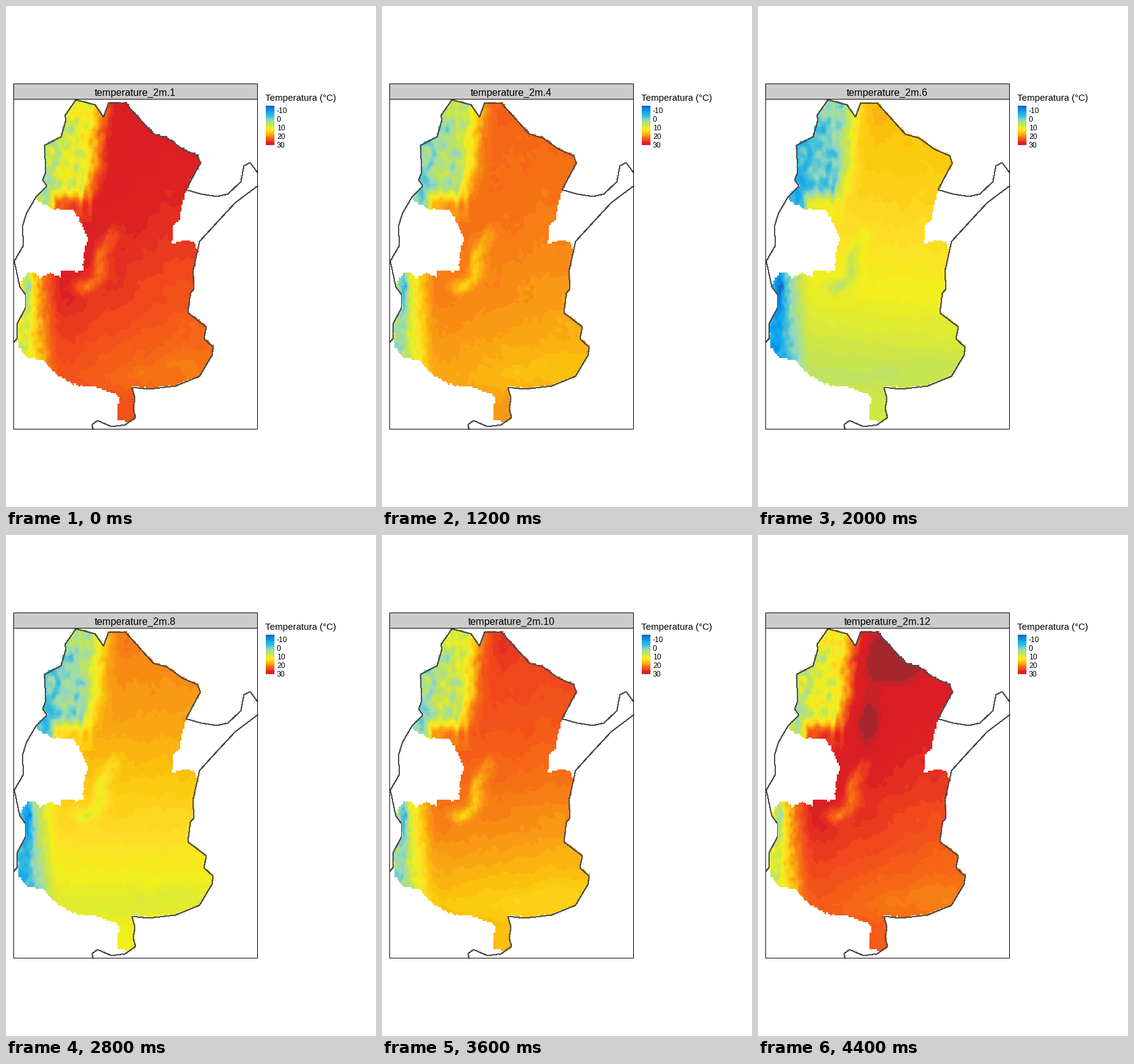
Write a matplotlib script that moves like this. It is 601 px wide and 814 px high and loops after 4.8 s.

```python
import numpy as np
import matplotlib.pyplot as plt
from matplotlib.animation import FuncAnimation
from matplotlib.colors import to_rgb
from matplotlib.patches import Rectangle
from matplotlib.path import Path

W, H, DPI = 601, 814, 100
PX = 72 / DPI
FONT = "Liberation Sans"

# Colour scale: temperature -> colour
SCALE = [(-15, "#1a62b8"), (-11, "#0a8fe8"), (-8, "#10a8ee"), (-3, "#45c0d8"),
         (1, "#95d9be"), (6.5, "#c8e650"), (10.5, "#f3f01c"), (13, "#ffdc28"),
         (15.5, "#fcc80c"), (18, "#faa014"), (20.5, "#f77614"), (24, "#f2471c"),
         (26.5, "#dc2024"), (29.2, "#da1e24"), (30.4, "#a5272d")]
STOPS = np.array([t for t, _ in SCALE])
COLOURS = np.array([to_rgb(c) for _, c in SCALE])
STEP = 0.8

# Country border in three strokes
EAST_LINE = [
    (113, 152), (144, 160), (158, 180), (166, 157), (194, 158), (239, 208),
    (261, 214), (286, 232), (311, 243), (315, 255), (292, 298), (316, 305),
    (342, 309), (360, 305), (381, 285), (386, 259), (396, 254), (408, 270)]
SOUTH_LINE = [
    (408, 292), (372, 319), (345, 348), (314, 382), (303, 431), (305, 459),
    (299, 466), (295, 498), (325, 521), (321, 540), (336, 554), (334, 567),
    (314, 601), (275, 617), (231, 622), (204, 619), (209, 637), (206, 654),
    (210, 668), (193, 680), (171, 683), (148, 673), (139, 680), (141, 687)]
WEST_LINE = [
    (113, 152), (95, 178), (97, 184), (89, 212), (62, 226), (64, 270),
    (59, 282), (66, 292), (48, 310), (33, 336), (26, 358), (28, 388),
    (13, 414), (22, 456), (31, 468), (31, 490), (17, 517), (18, 539), (13, 545)]

# Where the raster leaves the border
INNER_EAST = [(289, 308), (281, 348), (270, 361), (269, 387), (294, 381),
              (304, 384), (311, 399)]
INNER_SOUTH = [(203, 677), (181, 671), (181, 633), (150, 620), (107, 616),
               (76, 594), (60, 577), (33, 571), (20, 556)]
INNER_WEST = [(23, 448), (35, 433), (47, 433), (54, 442), (70, 434), (89, 441),
              (89, 430), (125, 431), (125, 406), (133, 380), (120, 350),
              (107, 331), (76, 331), (52, 318)]
LAND_EDGE = (EAST_LINE[:11] + INNER_EAST + SOUTH_LINE[4:19] + INNER_SOUTH
             + WEST_LINE[17:12:-1] + INNER_WEST + WEST_LINE[8:0:-1])

# Lowland temperature through the year at both ends of the map
KEY_MONTHS = [1, 3, 4, 6, 7, 9, 11, 12]
NORTH_TEMP = [27.2, 24.4, 21.4, 15.9, 15, 24, 24.9, 28.2]
SOUTH_TEMP = [20.3, 17, 15.9, 6.3, 6, 11.8, 16.6, 19.8]

# Cell grid of the raster
X0, Y0, DX, DY, NX, NY = 12.5, 152, 2.3, 2.73, 144, 195
X, Y = np.meshgrid(X0 + DX * (np.arange(NX) + .5), Y0 + DY * (np.arange(NY) + .5))

rng = np.random.default_rng(7)


def noise(nx, ny):
    """Random field smoothed over nx by ny cells, with unit spread."""
    a = rng.normal(size=X.shape)
    for axis, n in ((1, nx), (0, ny)):
        for _ in range(2):
            a = np.apply_along_axis(np.convolve, axis, a, np.ones(n) / n, "same")
    return a / a.std()


def bump(cx, cy, sx, sy):
    return np.exp(-((X - cx) / sx) ** 2 - ((Y - cy) / sy) ** 2)


def rise(v):
    return 1 / (1 + np.exp(-v))


def land_mask():
    ragged = [X + .7 * noise(2, 2), Y + .7 * noise(2, 2)]
    cells = np.column_stack([c.ravel() for c in ragged])
    return Path(LAND_EDGE).contains_points(cells).reshape(X.shape)


def north_range():
    foot = 155 - 29 * ((Y - 160) / 170).clip(0, 1) ** 1.7
    d = X - foot
    drop = 16 * rise(-(d + 3) / 8) + 2.5 * rise(-(d - 8) / 6) + 5 * rise(-(d + 65) / 9)
    valley = rise((Y - 309) / 4) * rise((X - 75) / 3)
    drop *= 1 - .8 * valley
    drop += 6 * bump(121, 312, 3.5, 20) + 3 * bump(136, 320, 3.5, 22)
    drop += 4 * bump(62, 300, 9, 22)
    rough = 1.9 * noise(3, 4) * np.clip(drop / 12, 0, 1)
    return (drop + rough) * (Y < 352)


def south_range():
    drop = 13 * rise((48 - X) / 8) + 4 * rise((72 - X) / 5) + 8 * bump(35, 468, 7, 42)
    rough = 1.4 * noise(2, 3) * np.clip(drop / 12, 0, 1)
    return (drop + rough) * (Y > 425)


def central_hills():
    ridge = np.interp(Y, [355, 405, 440, 465], [177, 154, 149, 124])
    width = np.where(X > ridge, 15, 9)
    span = rise((Y - 364) / 7) * rise((466 - Y) / 4)
    drop = 3.5 * np.exp(-((X - ridge) / width) ** 2) * span
    drop += 2 * bump(150, 418, 8, 32) + 3 * bump(122, 455, 14, 11)
    return drop * (1 + .15 * noise(2, 3))


LAND = land_mask()
NORTH, SOUTH, HILLS = north_range(), south_range(), central_hills()
FIXED = (.1 * noise(3, 3) + .12 * noise(9, 7) + 1.2 * bump(195, 185, 24, 26)
         + 1.5 * rise((Y - 622) / 4) - .6 * bump(268, 583, 46, 14)
         - 1.1 * bump(217, 595, 12, 9) - HILLS)
HOT_SPOTS = bump(222, 208, 62, 42) + bump(179, 312, 24, 50)
SOUTHNESS = np.clip((Y - 160) / 440, 0, 1)
WESTNESS = 1 - np.clip((X - 110) / 180, 0, 1) ** .8


def temperature(month):
    north = np.interp(month, KEY_MONTHS, NORTH_TEMP)
    south = np.interp(month, KEY_MONTHS, SOUTH_TEMP)
    t = north + (south - north) * SOUTHNESS ** 1.6 + FIXED
    # the dry west heats up more in summer and cools more in winter
    t += .25 * (south - 9) * WESTNESS * np.minimum(1, 1.5 * SOUTHNESS)
    t += 3.4 * max(0, north - 27.2) * HOT_SPOTS
    return t - (.68 + .012 * north) * NORTH - SOUTH


def colour(t):
    t = np.round(t / STEP) * STEP
    return np.stack([np.interp(t, STOPS, c) for c in COLOURS.T], axis=-1)


def raster(month):
    return np.dstack([colour(temperature(month)), LAND.astype(float)])


fig = plt.figure(figsize=(W / DPI, H / DPI), dpi=DPI, facecolor="white")
ax = fig.add_axes([0, 0, 1, 1])


def label(x, y, text, size, ha="left"):
    return ax.text(x, y, text, fontsize=size * PX, family=FONT, ha=ha,
                   va="baseline", color="black", zorder=5)


def line(points):
    x, y = np.array(points).T + .5
    ax.plot(x, y, color="#4d4d4d", lw=PX, antialiased=False, snap=False, zorder=3)


def box(x, y, w, h, fill):
    ax.add_patch(Rectangle((x, y), w, h, fc=fill, ec="black", lw=PX,
                           snap=False, zorder=4))


image = ax.imshow(raster(1), extent=(X0, X0 + NX * DX, Y0 + NY * DY, Y0),
                  interpolation="nearest", zorder=2)
for stroke in (EAST_LINE, SOUTH_LINE, WEST_LINE):
    line(stroke)
box(12.5, 126.5, 396, 25, "#cccccc")
box(12.5, 151.5, 396, 536, "none")
title = label(210, 146, "", 16.1, "center")

label(421, 154, "Temperatura (°C)", 15)
bar = colour(np.linspace(-15, 29, 64))[:, None]
ax.imshow(bar, extent=(422, 436, 226, 162), interpolation="nearest", zorder=2)
for i in range(5):
    label(440, 174.5 + 14 * i, str(10 * i - 10), 12)

ax.set_aspect("auto")
ax.set_xlim(0, W)
ax.set_ylim(H, 0)
ax.axis("off")


def update(i):
    month = i + 1
    image.set_data(raster(month))
    title.set_text(f"temperature_2m.{month}")
    return image, title


anim = FuncAnimation(fig, update, frames=12, interval=400, repeat=True)
plt.show()
```
